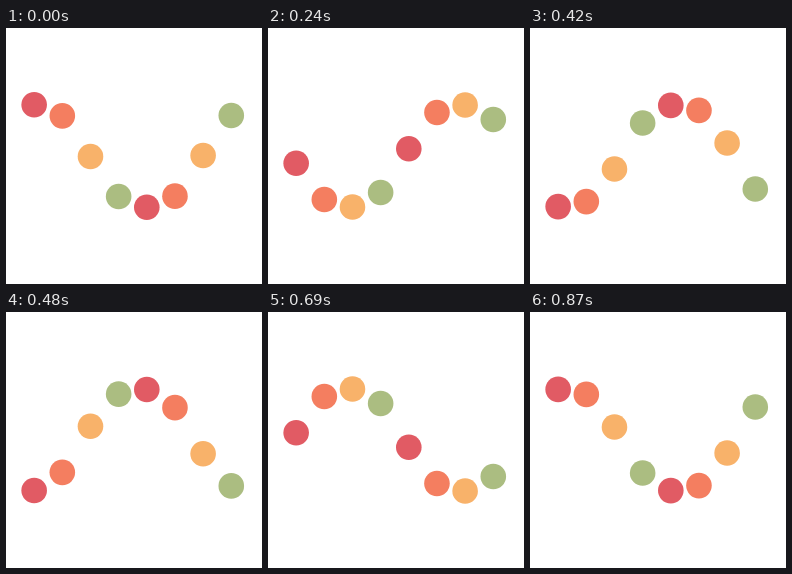
An HTML page that plays this animation: 256x256 px, repeating every 0.9 s.

```html
<!DOCTYPE html>
<html lang="en">
<head>
<meta charset="utf-8">
<title>Wave of dots</title>
<style>
  html, body { margin: 0; width: 100%; height: 100%; overflow: hidden; background: #fff; }
  svg { display: block; width: 100%; height: 100%; }
</style>
</head>
<body>
<svg viewBox="0 0 256 256"></svg>
<script>
const PERIOD = 900, COUNT = 8, SPACING = 28.16, TOP = 76.8, TRAVEL = 102.4;
const COLORS = ['#e15b64', '#f47e60', '#f8b26a', '#abbd81'];
const svg = document.querySelector('svg');

const dots = Array.from({ length: COUNT }, (_, i) => {
  const dot = document.createElementNS('http://www.w3.org/2000/svg', 'circle');
  dot.setAttribute('cx', SPACING * (i + 1));
  dot.setAttribute('r', 12.8);
  dot.setAttribute('fill', COLORS[i % COLORS.length]);
  return svg.appendChild(dot);
});

// cubic-bezier(.5, 0, .5, 1), solved in closed form
function ease(x) {
  const u = Math.sinh(Math.asinh(4 * (x - 0.5)) / 3);
  return 0.5 + 1.5 * u - 2 * u ** 3;
}

function draw(time) {
  dots.forEach((dot, i) => {
    const phase = (time / PERIOD + i / COUNT) % 1;
    const fall = 1 - Math.abs(1 - 2 * phase);
    dot.setAttribute('cy', TOP + TRAVEL * ease(fall));
  });
}

function tick() {
  draw(performance.now());
  requestAnimationFrame(tick);
}
tick();
</script>
</body>
</html>
```
